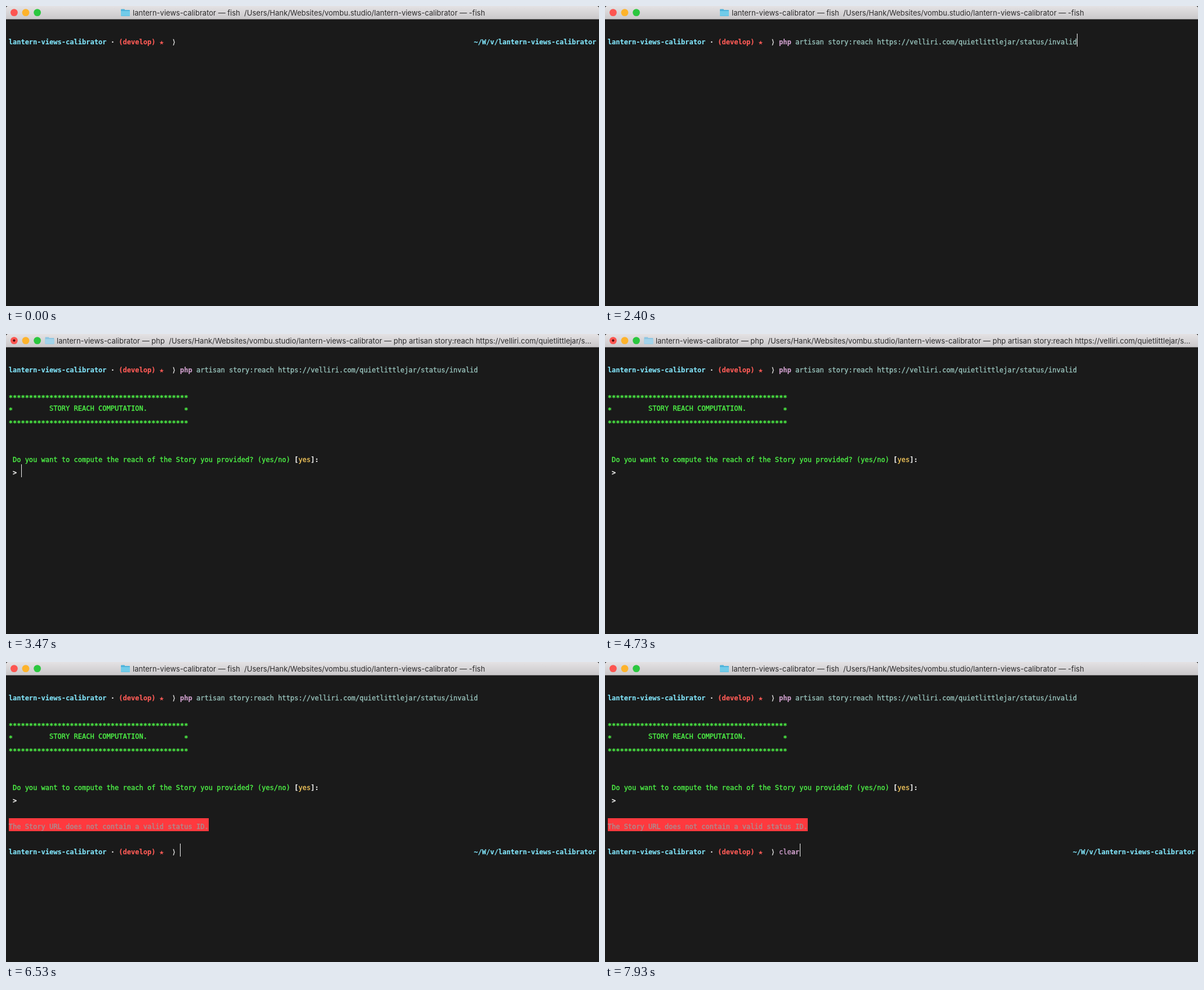
Animation, 1053 px wide and 532 px high, one loop 8000 ms. Source, as an HTML page with a canvas:

```html
<!DOCTYPE html>
<html lang="en">
<head>
<meta charset="utf-8">
<title>Terminal</title>
<style>
html, body { margin: 0; width: 100%; height: 100%; overflow: hidden; background: #1a1a1a; }
canvas { display: block; }
</style>
</head>
<body>
<canvas id="stage" width="1053" height="532"></canvas>
<script>
const ctx = document.getElementById('stage').getContext('2d');
const LOOP = 8000, BLINK = 960;
const CELL = 7.2466, LINE = 22.77, LEFT = 4.64, TOP = 48.8, BASE = 19.2;
const PROMPT_END = 42;

const C = {
  bg: '#1a1a1a', cyan: '#80e3f8', red: '#ff5c57', white: '#f1f1f0', purple: '#d0a0cd',
  teal: '#98c3bc', green: '#4ef547', yellow: '#f5c85c', alert: '#ff393e', muted: '#a88e91'
};

const project = 'lantern-views-calibrator';
const path = `/Users/Hank/Websites/vombu.studio/${project}`;
const url = 'https://velliri.com/quietlittlejar/status/invalid';
const args = ` artisan story:reach ${url}`;
const busyTail = `php artisan story:reach ${url.slice(0, 36)}...`;

// Moments in ms
const firstKeys = [600, 670, 800, 930, 1000], secondKeys = [7400, 7470, 7600, 7730, 7800];
const T = { bold: 1070, clear: 1330, paste: 1600, enter: 2670, php: 2740,
            banner: 3270, ask: 3450, error: 5270, prompt: 5600 };
const cursorResets = [-BLINK, ...firstKeys, T.clear, T.paste, T.enter, T.ask, T.error, T.prompt, ...secondKeys];

// Draws text on the character grid; the thin outline gives the soft, heavy rendering
function put(row, col, text, color, bold) {
  ctx.font = `${bold ? 'bold ' : ''}12.04px "DejaVu Sans Mono", monospace`;
  ctx.fillStyle = ctx.strokeStyle = color;
  ctx.lineWidth = bold ? 0.15 : 0.35;
  const y = TOP + row * LINE + BASE;
  [...text].forEach((ch, i) => {
    if (ch === ' ') return;
    const at = [ch, LEFT + (col + i) * CELL, y + (ch === '*' ? 3 : 0)];
    ctx.fillText(...at);
    ctx.strokeText(...at);
  });
}

function prompt(row, withPath) {
  put(row, 0, project, C.cyan, true);
  put(row, 25, '·', C.white, true);
  put(row, 27, '(develop)', C.red, true);
  put(row, 37, '★', C.red);
  put(row, 40, '⟩', C.white);
  if (withPath) put(row, 114, '~/W/v/' + project, C.cyan, true);
}

function disc(x, y, r, color) {
  ctx.fillStyle = color;
  ctx.beginPath();
  ctx.arc(x, y, r, 0, 7);
  ctx.fill();
}

function folder(x, pale) {
  ctx.fillStyle = pale ? '#8ec6e2' : '#4fb4dc';
  ctx.beginPath();
  ctx.roundRect(x, 5.5, 7, 4, 1);
  ctx.roundRect(x, 7, 16, 11, 1);
  ctx.fill();
  ctx.fillStyle = pale ? '#a3d4ea' : '#71cbe9';
  ctx.fillRect(x, 9, 16, 8.5);
}

function titleBar(t) {
  const busy = t >= T.php && t < T.prompt;
  const shell = t >= T.php && t < T.error ? 'php' : 'fish';
  const shade = ctx.createLinearGradient(0, 0, 0, 23);
  shade.addColorStop(0, '#e4e2e4');
  shade.addColorStop(1, '#cac8ca');
  ctx.fillStyle = shade;
  ctx.beginPath();
  ctx.roundRect(0, 0, 1053, 23.4, [4, 4, 0, 0]);
  ctx.fill();
  ['#fc5550', '#fdb32b', '#2bc73f'].forEach((color, i) => disc(14.4 + i * 20.6, 11.6, 6.4, color));
  if (busy) disc(14.4, 11.6, 2.1, '#4d0505');
  folder(busy ? 69.5 : 204, busy);
  ctx.font = '13px Inter, sans-serif';
  ctx.fillStyle = '#2c2b2c';
  ctx.fillText(`${project} — ${shell}  ${path} — ${busy ? busyTail : '-fish'}`, busy ? 90 : 225, 16.6);
}

function cursor(t, row, col) {
  const last = cursorResets.filter(k => k <= t).pop();
  if (Math.floor((t - last) / BLINK) % 2) return;
  ctx.fillStyle = '#f4f4f4';
  ctx.fillRect(Math.ceil(LEFT + col * CELL), Math.round(TOP + row * LINE), 1, 23);
}

const typed = (keys, t) => keys.filter(k => k <= t).length;

function draw(t) {
  ctx.fillStyle = C.bg;
  ctx.fillRect(0, 0, 1053, 532);
  titleBar(t);
  prompt(0, t < T.paste);
  let row = 0, col = PROMPT_END;

  if (t < T.clear) {
    const n = typed(firstKeys, t);
    put(0, col, 'clear'.slice(0, n), C.purple, t >= T.bold);
    col += n;
  }
  if (t >= T.paste) {
    put(0, col, 'php', C.purple, true);
    put(0, col + 3, args, C.teal);
    col += 3 + args.length;
  }
  if (t >= T.enter) [row, col] = [1, 0];
  if (t >= T.banner) {
    const stars = '*'.repeat(44);
    put(2, 0, stars, C.green, true);
    put(3, 0, '*', C.green, true);
    put(3, 10, 'STORY REACH COMPUTATION.', C.green);
    put(3, 43, '*', C.green, true);
    put(4, 0, stars, C.green, true);
    row = 5;
  }
  if (t >= T.ask) {
    put(7, 1, 'Do you want to compute the reach of the Story you provided? (yes/no)', C.green);
    put(7, 70, '[', C.white, true);
    put(7, 71, 'yes', C.yellow);
    put(7, 74, ']:', C.white, true);
    put(8, 1, '>', C.white, true);
    [row, col] = [8, 3];
  }
  if (t >= T.error) {
    const message = 'The Story URL does not contain a valid status ID.';
    ctx.fillStyle = C.alert;
    ctx.fillRect(5, Math.round(TOP + 10 * LINE), Math.round(message.length * CELL), 23);
    put(10, 0, message, C.muted);
    [row, col] = [11, 0];
  }
  if (t >= T.prompt) {
    const n = typed(secondKeys, t);
    prompt(12, true);
    put(12, PROMPT_END, 'cle'.slice(0, n), C.purple);
    put(12, PROMPT_END + 3, 'ar'.slice(0, Math.max(0, n - 3)), C.purple, true);
    [row, col] = [12, PROMPT_END + n];
  }
  cursor(t, row, col);
}

const start = performance.now();
function tick() {
  draw((performance.now() - start) % LOOP);
  requestAnimationFrame(tick);
}
tick();
</script>
</body>
</html>
```
